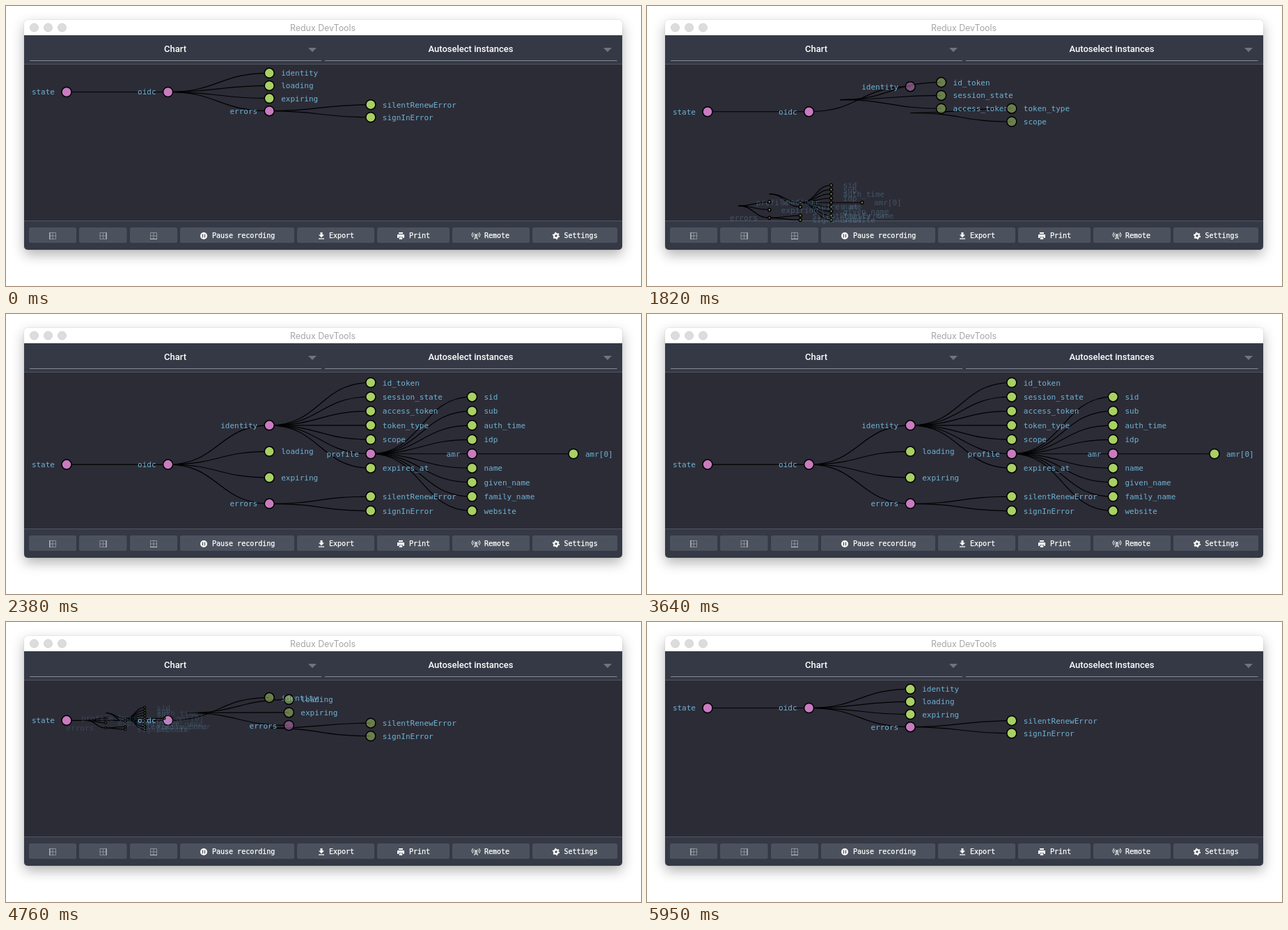
These frames come from a looping animation (912 px wide and 402 px high, 6.02 s). An HTML page:

```html
<!DOCTYPE html>
<html lang="en">
<head>
<meta charset="utf-8">
<title>State chart</title>
<style>
  html, body { margin: 0; width: 100%; height: 100%; overflow: hidden; background: #fff; }
  #window {
    position: absolute; left: 26px; top: 20px; width: 859px; height: 330px;
    border-radius: 5px; box-shadow: 0 7px 18px rgba(0, 0, 0, .3), 0 0 1px rgba(0, 0, 0, .4);
  }
  svg { position: absolute; left: 0; top: 0; display: block; }
  .title { font: 12.4px Inter, "Liberation Sans", sans-serif; fill: #a6a6a6; text-anchor: middle; }
  .select { font: 500 13px Roboto, sans-serif; fill: #fff; text-anchor: middle; }
  .label { font: 10px "DejaVu Sans Mono", monospace; fill: #fff; stroke: #fff; stroke-width: .25px; }
  .node text { font: 11px "DejaVu Sans Mono", monospace; fill: #6fb3d2; }
  .node circle { stroke: #000; stroke-width: 1.5px; }
  #links path { fill: none; stroke: #000; stroke-width: 1.2px; }
</style>
</head>
<body>
<div id="window"></div>
<svg width="912" height="402" viewBox="0 0 912 402">
  <clipPath id="frame"><rect x="26" y="20" width="859" height="330" rx="5"/></clipPath>
  <g clip-path="url(#frame)">
    <rect x="26" y="20" width="859" height="22" fill="#fff"/>
    <rect x="26" y="42" width="859" height="308" fill="#353946"/>
    <rect x="26" y="84" width="859" height="224" fill="#2c2c37"/>
    <path d="M26 83.5H885M26 308.5H885" stroke="#505662"/>
    <path d="M34 78.5H453M458 78.5H877.500" stroke="#858993"/>
  </g>
  <g fill="#dcdcdc" stroke="#cfcfcf" stroke-width=".8">
    <circle cx="40.500" cy="31" r="6"/><circle cx="60.500" cy="31" r="6"/><circle cx="80.500" cy="31" r="6"/>
  </g>
  <text class="title" x="455" y="35.500">Redux DevTools</text>
  <text class="select" x="243" y="66">Chart</text>
  <text class="select" x="667.500" y="66">Autoselect instances</text>
  <path d="M434 60H446L440 66ZM858 60H870L864 66Z" fill="#70747f"/>

  <g id="links"></g>
  <g id="nodes"></g>

  <g id="buttons"></g>
  <g id="icons" fill="#fff">
    <g fill="none" stroke="#c3c6cb">
      <g id="grid"><path d="M62.500 325.500h9v9h-9zM62.500 330h9M67 325.500v9" stroke-dasharray="1 1"/></g>
      <use href="#grid" x="72.500"/><use href="#grid" x="145"/>
      <path d="M63 325v10M144 325v10M207 334.500h10"/>
    </g>
    <circle cx="284" cy="330" r="5"/>
    <path d="M282.500 327.500v5M285.500 327.500v5" stroke="#4b515c" stroke-width="1.300"/>
    <path d="M451.500 325h3v3.500h2.500l-4 4-4-4h2.500zM449 333.500h8v1.300h-8z"/>
    <path d="M564 325h6v2h-6zM562 328h10v5h-2v-1.500h-6v1.500h-2zM564.800 332.300h4.400v2.700h-4.400z"/>
    <g fill="none" stroke="#fff">
      <path d="M675 329l-2.500 6M675 329l2.500 6M673.500 333h3"/>
      <path d="M672.500 330.500a3 3 0 0 1 0-4M677.500 330.500a3 3 0 0 0 0-4M670.500 332a5.500 5.500 0 0 1 0-7M679.500 332a5.500 5.500 0 0 0 0-7"/>
    </g>
    <circle cx="675" cy="328.500" r="1.300"/>
    <g fill="none" stroke="#fff">
      <circle cx="790" cy="330" r="2.800" stroke-width="2.200"/>
      <circle cx="790" cy="330" r="4.400" stroke-width="1.500" stroke-dasharray="2 2.608"/>
    </g>
  </g>
</svg>
<script>
const LOOP = 6020, EXPAND = 1503, COLLAPSE = 4284, DURATION = 750;
const LEAF = '#a8d063', PARENT = '#c97bbf';
const svgNS = 'http://www.w3.org/2000/svg';

function add(parent, tag, attrs = {}, text = '') {
  const el = document.createElementNS(svgNS, tag);
  set(el, attrs);
  el.textContent = text;
  return parent.appendChild(el);
}
function set(el, attrs) {
  for (const key in attrs) el.setAttribute(key, attrs[key]);
}

// Buttons: left, right, label, label position
const buttons = document.getElementById('buttons');
[[33, 101], [105, 173.5], [178, 246], [250, 414, 'Pause recording', 296],
 [418, 529, 'Export', 464], [533, 637, 'Print', 579],
 [641, 752, 'Remote', 687], [756, 878, 'Settings', 801.5]
].forEach(([x, right, label, at]) => {
  add(buttons, 'rect', { x, y: 318, width: right - x, height: 22, rx: 2.5, fill: '#4c525d' });
  if (label) add(buttons, 'text', { class: 'label', x: at, y: 333 }, label);
});

// Trees in preorder, one "name depth row" entry per node
function tree(text, top, gap) {
  const path = [];
  const list = text.split(',').map(entry => {
    const [name, depth, row] = entry.trim().split(' ');
    const node = { name, x: 87 + 145.6 * depth, y: top + gap * row, parent: path[depth - 1] };
    if (node.parent) node.parent.hasKids = true;
    return path[depth] = node;
  });
  return list;
}
const small = tree(`state 0 1.5, oidc 1 1.5, identity 2 0, loading 2 1, expiring 2 2,
  errors 2 3, silentRenewError 3 2.5, signInError 3 3.5`, 96.3, 18.13);
const large = tree(`state 0 5.75, oidc 1 5.75, identity 2 3, id_token 3 0, session_state 3 1,
  access_token 3 2, token_type 3 3, scope 3 4, profile 3 5, sid 4 1, sub 4 2, auth_time 4 3,
  idp 4 4, amr 4 5, amr[0] 5 5, name 4 6, given_name 4 7, family_name 4 8, website 4 9,
  expires_at 3 6, loading 2 4.833, expiring 2 6.667, errors 2 8.5,
  silentRenewError 3 8, signInError 3 9`, 98.5, 20.45);
const entry = { x: 87, y: 318 };
const root = small[0];

const links = document.getElementById('links');
const nodes = document.getElementById('nodes');
const views = large.map(() => {
  const group = add(nodes, 'g', { class: 'node' });
  return {
    link: add(links, 'path'), group,
    circle: add(group, 'circle'),
    label: add(group, 'text', { y: 4 })
  };
});

const clamp = v => Math.max(0, Math.min(1, v));
const ease = t => t < .5 ? 4 * t ** 3 : 1 - 4 * (1 - t) ** 3;
const mix = (a, b, p) => ({ x: a.x + (b.x - a.x) * p, y: a.y + (b.y - a.y) * p });

function curve(a, b) {
  const mid = (a.x + b.x) / 2;
  return `M${a.x} ${a.y}C${mid} ${a.y} ${mid} ${b.y} ${b.x} ${b.y}`;
}

function draw(time) {
  const opening = time >= EXPAND && time < COLLAPSE;
  const start = opening ? EXPAND : COLLAPSE;
  const age = time < EXPAND ? DURATION : time - start;
  const p = ease(clamp(age / DURATION));
  const dim = clamp((age - 220) / 100) * clamp((DURATION - age) / 130);

  views.forEach((view, i) => {
    const extra = i >= small.length;
    const hidden = extra && !opening && p === 1;
    view.group.style.display = view.link.style.display = hidden ? 'none' : '';
    if (hidden) return;

    const node = opening || extra ? large[i] : small[i];
    const from = opening ? small[i] || entry : large[i];
    const to = opening ? large[i] : small[i] || root;
    const at = mix(from, to, p);
    const size = extra ? (opening ? p : 1 - p) : 1;
    const steady = i < 2 || (extra && !opening);

    set(view.group, { transform: `translate(${at.x} ${at.y})` });
    set(view.circle, {
      r: 7 * size,
      fill: node.hasKids ? PARENT : LEAF,
      'fill-opacity': steady ? 1 : 1 - .5 * dim
    });
    set(view.label, {
      x: node.hasKids ? -17 : 17,
      'text-anchor': node.hasKids ? 'end' : 'start',
      'fill-opacity': size
    });
    if (view.label.textContent !== node.name) view.label.textContent = node.name;

    if (i) {
      const fromParent = from.parent || from;
      const toParent = to.parent || to;
      set(view.link, { d: curve(mix(fromParent, toParent, p), at) });
    }
  });
}

const begin = performance.now();
function tick() {
  draw((performance.now() - begin) % LOOP);
  requestAnimationFrame(tick);
}
tick();
</script>
</body>
</html>
```
